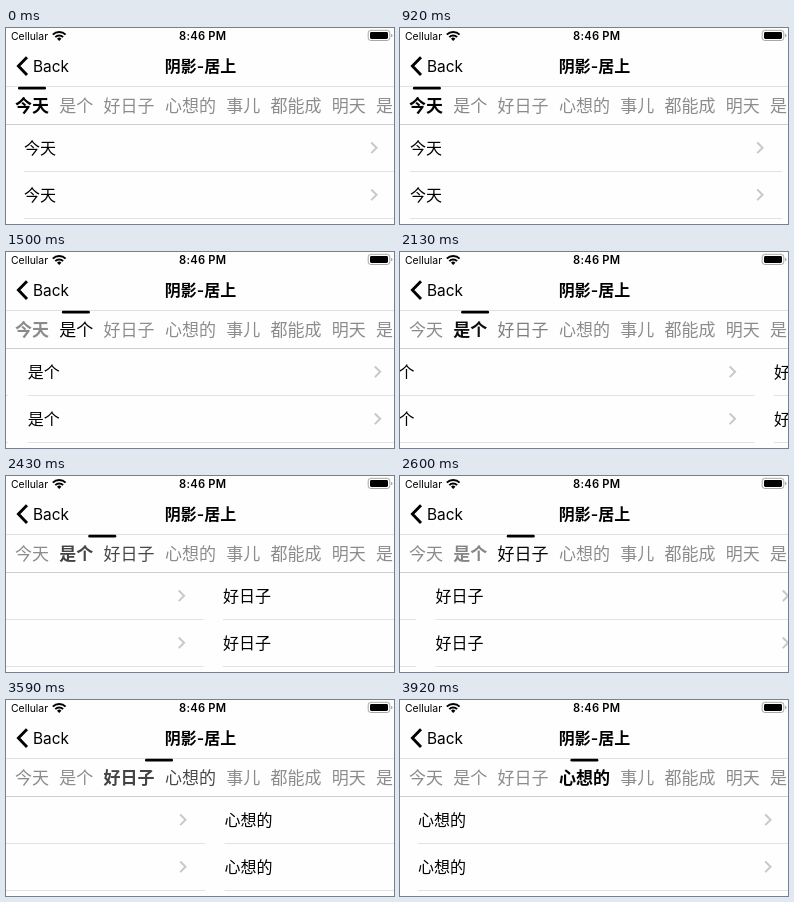
An HTML page for the animation above (5.04 s loop, 388 px wide and 196 px high).

```html
<!DOCTYPE html>
<html lang="zh-CN">
<head>
<meta charset="utf-8">
<title>Tab pager</title>
<style>
  html, body { margin: 0; width: 100%; height: 100%; overflow: hidden; background: #fefefe; }
  svg { display: block; width: 388px; height: 196px; }
  text { font-family: Inter, "Noto Sans CJK SC", "Noto Sans CJK", sans-serif; white-space: pre; }
  .status { font-size: 10.4px; }
  .clock { font-size: 11.2px; font-weight: 600; letter-spacing: .25px; }
  .title { font-size: 16px; font-weight: 600; }
  .back { font-size: 15.4px; }
  .tab { font-size: 17px; }
  .cell { font-size: 16px; }
  .stroke { fill: none; stroke: #000; }
</style>
</head>
<body>
<svg viewBox="0 0 388 196">
  <g id="pages"></g>

  <text class="status" x="5" y="11.8">Cellular</text>
  <g class="stroke" stroke-width="2">
    <path d="M46.8 6.6a9 9 0 0 1 12.8 0"/>
    <path d="M49.3 9.1a5.5 5.5 0 0 1 7.8 0"/>
  </g>
  <path d="M53.2 13l-2.2-2.3a3.1 3.1 0 0 1 4.4 0z"/>
  <text class="clock" x="196.7" y="11.8" text-anchor="middle">8:46 PM</text>
  <rect class="stroke" x="362.2" y="2.3" width="21.6" height="10.2" rx="2.6" style="stroke:#a8a8a8"/>
  <rect x="364" y="4" width="18" height="7" rx="1.4"/>
  <path d="M385 5.8q1.5 .4 1.5 1.7t-1.5 1.7z" fill="#a8a8a8"/>

  <path class="stroke" d="M21 29.2L12.4 38l8.6 9" stroke-width="2.9"/>
  <text class="back" x="27" y="43.5">Back</text>
  <text class="title" x="194.6" y="44" text-anchor="middle">阴影-居上</text>

  <rect y="58" width="388" height="1" fill="#e0e0e0"/>
  <rect y="96" width="388" height="1" fill="#cfcfcf"/>
  <g id="tabs"></g>
  <rect id="bar" y="58.8" width="28" height="2.8" rx="1.3"/>
</svg>
<script>
const LOOP = 5040, PAGE = 391.5, ROW = 47, GREY = 140;
const names = ['今天', '是个', '好日子', '心想的', '事儿', '都能成', '明天', '是'];

// Each swipe: a short drag [time, px], then a fling over the remaining px, sampled at the given times.
const swipes = [
  { drag: [[920, 8], [980, 19]], rest: 198.5,
    fling: [1220, 1280, 1340, 1390, 1450, 1500, 1560] },
  { drag: [[2130, 35.5], [2190, 55]], rest: 199,
    fling: [2430, 2490, 2550, 2600, 2630, 2690, 2750] },
  { drag: [[3230, 23], [3290, 45], [3320, 58]], rest: 200.5,
    fling: [3590, 3650, 3700, 3760, 3810, 3870, 3920] }
];

const $ = id => document.getElementById(id);
function add(parent, tag, attrs, text = '') {
  const el = document.createElementNS('http://www.w3.org/2000/svg', tag);
  for (const k in attrs) el.setAttribute(k, attrs[k]);
  el.textContent = text;
  return parent.appendChild(el);
}

let left = 9;
const centers = [];
const tabs = names.map(name => {
  const width = 17 * name.length;
  const el = add($('tabs'), 'text', { class: 'tab', x: left, y: 84 }, name);
  centers.push(left + width / 2);
  left += width + 10.3;
  return el;
});

names.slice(0, 4).forEach((name, i) => {
  const page = add($('pages'), 'g', { transform: `translate(${i * PAGE})` });
  for (const y of [96, 96 + ROW]) {
    add(page, 'text', { class: 'cell', x: 18, y: y + 30 }, name);
    add(page, 'path', {
      d: `M365.2 ${y + 18.5}l5.4 5.3l-5.4 5.3`,
      fill: 'none', stroke: '#c7c7cc', 'stroke-width': 1.9
    });
    add(page, 'rect', { x: 18, y: y + ROW, width: 372, height: 1, fill: '#e2e2e2' });
  }
});

const lastBefore = (list, t) => list.filter(v => v <= t).pop();

function stateAt(t) {
  let pos = 0, bold = 0;
  swipes.forEach(({ drag, rest, fling }, i) => {
    const start = fling[0], end = fling[fling.length - 1];
    if (t < drag[0][0]) return;
    if (t >= end) {
      pos = bold = i + 1;
    } else if (t >= start) {
      pos = i + 1 - rest / PAGE * Math.exp((start - lastBefore(fling, t)) / 70);
    } else {
      pos = i + drag.filter(d => d[0] <= t).pop()[1] / PAGE;
    }
  });
  return { pos, bold };
}

function draw(t) {
  const { pos, bold } = stateAt(t);
  $('pages').setAttribute('transform', `translate(${-pos * PAGE})`);

  const i = Math.floor(pos);
  const mid = centers[i] + (centers[i + 1] - centers[i]) * (pos - i);
  $('bar').setAttribute('x', mid - 14);

  tabs.forEach((el, n) => {
    const c = Math.round(GREY * Math.min(1, Math.abs(n - pos)));
    el.style.fill = `rgb(${c},${c},${c})`;
    el.style.fontWeight = n === bold ? 600 : 400;
  });
}

const t0 = performance.now();
function tick() {
  draw((performance.now() - t0) % LOOP);
  requestAnimationFrame(tick);
}
tick();
</script>
</body>
</html>
```
